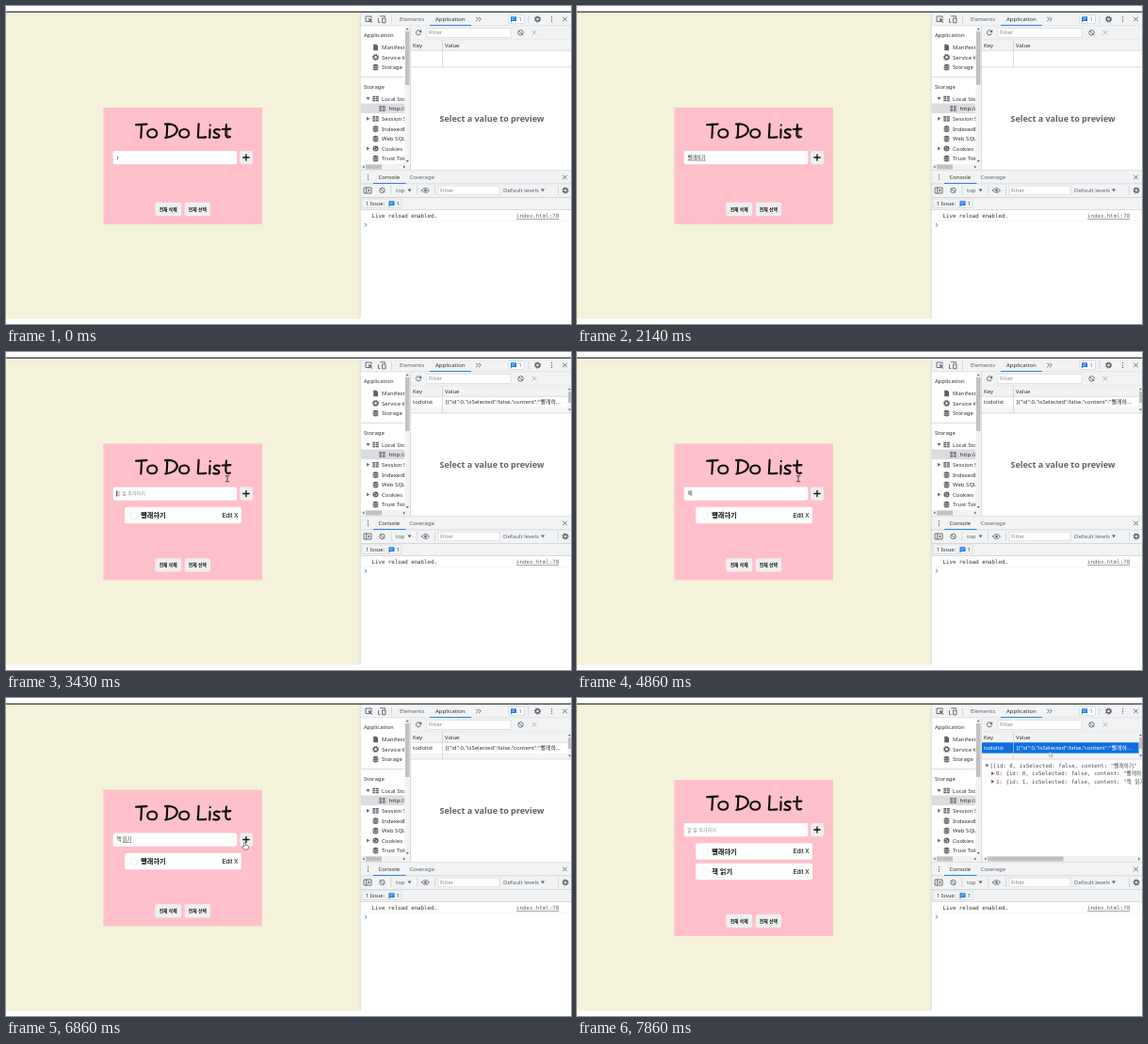
Animation, 600 px wide and 338 px high, one loop 8000 ms. Source, as an HTML page:

```html
<!DOCTYPE html>
<html lang="ko">
<head>
<meta charset="utf-8">
<title>To Do List</title>
<style>
html, body { margin: 0; width: 100%; height: 100%; overflow: hidden; background: #fff; }
svg { display: block; width: 600px; height: 338px; }
text { font-family: 'Noto Sans', 'Noto Sans CJK KR', sans-serif; white-space: pre; }
.mono { font-family: 'DejaVu Sans Mono', 'Noto Sans CJK KR', monospace; }
.kr { font-family: 'Noto Sans CJK KR', 'Noto Sans CJK', sans-serif; }
.arial { font-family: 'Liberation Sans', sans-serif; }
.line { fill: none; stroke: #5f6368; stroke-linecap: round; stroke-linejoin: round; }
</style>
</head>
<body>
<svg id="stage" viewBox="0 0 600 338" xmlns="http://www.w3.org/2000/svg"></svg>
<script>
const LOOP = 8000;
const GREY = '#5f6368', BAR = '#f1f3f4', RULE = '#cacdd1', BLUE = '#1a73e8', DARK = '#303134';

const rect = (x, y, w, h, fill, extra = '') =>
  `<rect x="${x}" y="${y}" width="${w}" height="${h}" fill="${fill}" ${extra}/>`;
// y is the vertical middle of the text
const label = (x, y, str, { size = 6, fill = DARK, cls = '', extra = '' } = {}) =>
  `<text x="${x}" y="${y + size * 0.36}" font-size="${size}" fill="${fill}" class="${cls}" ${extra}>${str}</text>`;
const stroke = (d, color = GREY, w = 0.9) =>
  `<path class="line" d="${d}" style="stroke:${color};stroke-width:${w}"/>`;
const solid = (d, fill = GREY) => `<path d="${d}" fill="${fill}"/>`;
const ring = (x, y, r, color = GREY, w = 0.9) =>
  `<circle cx="${x}" cy="${y}" r="${r}" fill="none" stroke="${color}" stroke-width="${w}"/>`;
const hRule = (x, y, w) => rect(x, y, w, 0.7, RULE);
const vRule = (x, y, h) => rect(x, y, 0.7, h, RULE);

const icon = {
  cross: (x, y, c) => stroke(`M${x - 2} ${y - 2}l4 4m0-4l-4 4`, c),
  block: (x, y) => ring(x, y, 2.7) + stroke(`M${x - 1.9} ${y - 1.9}l3.8 3.8`),
  gear: (x, y) => ring(x, y, 2, GREY, 1.3) +
    `<circle cx="${x}" cy="${y}" r="3" fill="none" stroke="${GREY}" stroke-width="1.1" stroke-dasharray="1.25 1.1"/>`,
  dots: (x, y) => [-2.4, 0, 2.4].map(d => `<circle cx="${x}" cy="${y + d}" r=".7" fill="${GREY}"/>`).join(''),
  table: (x, y) => rect(x - 3.2, y - 2.8, 6.4, 5.6, GREY) +
    stroke(`M${x - 3} ${y - 0.9}h6m-6 1.9h6m-3-3.7v5.5`, '#fff', 0.6),
  db: (x, y) => solid(`M${x - 2.8} ${y - 2.3}q2.8-1.8 5.6 0v4.8q-2.8 1.8-5.6 0z`) +
    stroke(`M${x - 2.6} ${y - 1}q2.6 1 5.2 0m-5.2 2.2q2.6 1 5.2 0`, '#fff', 0.5),
  page: (x, y) => solid(`M${x - 2.3} ${y - 3.2}h3l1.8 1.8v4.6h-4.8z`),
  cookie: (x, y) => `<circle cx="${x}" cy="${y}" r="3" fill="${GREY}"/>` +
    [[-1, -1], [1, 0.4], [-0.6, 1.3]].map(([a, b]) => `<circle cx="${x + a}" cy="${y + b}" r=".6" fill="#fff"/>`).join(''),
  chat: (x, y) => solid(`M${x - 3} ${y - 2.7}h6v4.6h-4.4l-1.6 1.5z`, BLUE) +
    stroke(`M${x - 1.6} ${y - 1.2}h3.2m-3.2 1.5h2.2`, '#fff', 0.5),
  right: (x, y) => solid(`M${x - 1.4} ${y - 2}l3 2l-3 2z`),
  down: (x, y) => solid(`M${x - 2} ${y - 1.4}h4l-2 3z`),
  up: (x, y) => solid(`M${x - 1.5} ${y + 0.8}h3l-1.5-2z`),
};

function sidebar() {
  const rows = [
    [44, 'page', 'Manifest'], [54.5, 'gear', 'Service Workers'], [65, 'db', 'Storage'],
    [98.5, 'table', 'Local Storage', 'down'], [119.8, 'table', 'Session Storage', 'right'],
    [130.5, 'db', 'IndexedDB'], [141, 'db', 'Web SQL'],
    [151.5, 'cookie', 'Cookies', 'right'], [162, 'db', 'Trust Tokens'],
  ];
  return rect(376.5, 21.5, 53, 153, '#fff') +
    `<g clip-path="url(#side)">` +
    label(380, 31, 'Application') + hRule(377, 75, 47) + label(380, 86, 'Storage') +
    rect(377, 103.5, 47, 10.6, '#dadce0') + icon.table(399.5, 109) + label(406.5, 109, 'http://127.0.0.1') +
    rows.map(([y, pic, name, arrow]) =>
      icon[pic](392.5, y) + label(399, y, name) + (arrow ? icon[arrow](384.5, y) : '')).join('') +
    `</g>` +
    rect(423.5, 21.5, 5.5, 147, BAR) + rect(424, 27, 4.5, 57, '#c1c1c1') +
    icon.up(426.2, 24.5) + solid('M424.8 164h3l-1.5 2z') +
    rect(376.5, 168, 53, 6, BAR) + rect(382, 168.5, 17, 5, '#c1c1c1') +
    solid('M380.5 169.5v3l-2-1.5z') + solid('M422 169.5v3l2-1.5z') + vRule(429.3, 21.5, 153);
}

function devtools() {
  return rect(376, 7, 224, 331, '#fff') + rect(376, 7, 224, 14, BAR) +
    // main tabs
    stroke('M386 16.5h-4v-5.5h6v2') + solid('M385 13l4.2 1.6l-1.8.7l1.6 1.8l-.9.8l-1.5-1.8l-.8 1.4z') +
    stroke('M397 17.5h-1.5v-4m2-2.7h5v1m-2.5 1.2h3v4.8h-3z') + vRule(409, 9.5, 10) +
    label(418, 14, 'Elements', { fill: GREY }) + label(456, 14, 'Application') +
    stroke('M499.5 12l2 2l-2 2m2.8-4l2 2l-2 2') +
    rect(533.5, 9.5, 17, 9, '#fff', `rx="1.5" stroke="${RULE}" stroke-width=".6"`) + icon.chat(539, 14) +
    label(544.5, 14, '1', { size: 5.5, fill: BLUE }) + vRule(554.5, 9.5, 9) +
    icon.gear(564.5, 14) + icon.dots(579.5, 14) + icon.cross(593.5, 14) +
    hRule(376, 20.7, 224) + rect(450, 20, 44, 0.9, BLUE) +
    sidebar() +
    // storage toolbar and table
    rect(430, 21.5, 170, 14, BAR) + stroke('M440 26.6a2.6 2.6 0 1 0 .5 2.4') + solid('M441.2 25v2.9h-2.9z') +
    rect(447, 23.5, 89, 9.7, '#fff', `stroke="${RULE}" stroke-width=".5"`) +
    label(449, 28.3, 'Filter', { fill: '#80868b' }) + icon.block(546.5, 28.3) + icon.cross(561, 28.3, '#aaa') +
    hRule(430, 35.7, 170) + rect(430, 36.4, 170, 10.4, BAR) +
    label(432, 41.8, 'Key') + label(466, 41.8, 'Value') + hRule(430, 46.8, 170) +
    '<g id="table"></g>' + hRule(430, 64.6, 170) + '<g id="preview"></g>' +
    // console drawer
    hRule(376, 174, 224) + rect(376, 174.7, 224, 41.5, BAR) +
    icon.dots(384.5, 182) + label(395.5, 182, 'Console') + label(428.5, 182, 'Coverage', { fill: GREY }) +
    icon.cross(593.5, 182) + hRule(376, 188.6, 224) + rect(390, 188, 34.5, 0.9, BLUE) +
    stroke('M380.5 193h7.5v6h-7.5zm2.2 0v6') + solid('M384.5 194.3l2.4 1.7l-2.4 1.7z') + icon.block(399.5, 196) +
    vRule(408.5, 191, 10) + label(414, 196, 'top', { fill: GREY }) + icon.down(428.5, 196) + vRule(436.5, 191, 10) +
    stroke('M441.5 196q4-5 8 0q-4 5-8 0z') + `<circle cx="445.5" cy="196" r="1.3" fill="${GREY}"/>` + vRule(455, 191, 10) +
    rect(459, 191.2, 65, 9.6, '#fff', `stroke="${RULE}" stroke-width=".5"`) +
    label(461, 196, 'Filter', { fill: '#80868b' }) + label(528, 196, 'Default levels', { fill: GREY }) +
    icon.down(570, 196) + vRule(586, 191, 10) + icon.gear(594, 196) + hRule(376, 203, 224) +
    rect(378, 205, 42, 9.8, BAR, `stroke="${RULE}" stroke-width=".5"`) +
    label(382, 210, '1 Issue:', { size: 5.6 }) + icon.chat(409.5, 210) + label(414.5, 210, '1', { size: 5.6 }) +
    hRule(376, 216, 224) + label(388.5, 223, 'Live reload enabled.', { size: 5.78, cls: 'mono' }) +
    label(542, 223, 'index.html:78', { size: 5.78, cls: 'mono', fill: GREY, extra: 'text-decoration="underline"' }) +
    rect(376, 228, 224, 0.5, '#eee') + stroke('M381.3 231.2l1.6 1.6l-1.6 1.6', BLUE) + vRule(375.8, 7, 325);
}

// Handwritten heading, relative to the card's top edge
const heading = '<g role="img" aria-label="To Do List">' + [
  'M138 18.2Q144 17.6 149.5 17.6M144 18Q143.8 25 143.3 32',
  'M155.6 23C148.6 22.8 148.4 31.8 154.8 31.8C161.8 31.8 162 23.2 155.6 23',
  'M171.2 18Q171.2 25 170.5 31.8M169 17.6C186 15.6 186 30.8 169.2 32',
  'M189.6 23C182.6 22.8 182.4 31.8 188.8 31.8C195.8 31.8 196 23.2 189.6 23',
  'M204.6 17.3Q204.4 25 203.8 31.6Q208.4 32 212.4 31.4',
  'M216.5 23.4Q216.6 28 216.2 32M216.8 18.6v.2',
  'M226.8 23.6C222 22 218.6 25.2 222.8 27.2C229.3 29.6 226.3 33 220.2 31.4',
  'M234 18Q233.4 25 233.4 28.6Q233.8 32.8 238 31M229.8 23Q234 22.7 238.4 22.6',
].map(d => stroke(d, '#0c0a0a', 2.1)).join('') + '</g>';

function card(items, { text, underlined, caret }) {
  const height = 124 + 21 * items.length;
  const button = (x, w, name) => rect(x, height - 23.3, w, 14.3, '#efefef', 'rx="2"') +
    label(x + w / 2, height - 16.2, name, { size: 4.8, cls: 'kr', fill: '#111', extra: 'text-anchor="middle" font-weight="700"' });
  const typed = text
    ? label(117.5, 53, text, { size: 5.2, cls: 'kr', fill: '#333' })
    : label(117, 53, '할 일 추가하기', { size: 5.1, cls: 'kr', fill: '#858585' });
  const [from, chars] = underlined;
  return `<g transform="translate(0 ${170 - height / 2})">` +
    rect(103.3, 0, 168.7, height, '#ffc0cb') + heading +
    rect(113.7, 46, 131.6, 14.3, '#fff', 'rx="2"') + typed +
    (chars ? rect(from, 55.8, chars * 4.78, 0.5, '#444') : '') +
    (caret ? rect(117.4, 50, 0.7, 6, '#000') : '') +
    rect(248.3, 46, 13.7, 14.3, '#efefef', 'rx="2"') + stroke('M251.8 53h6.4m-3.2-3.2v6.4', '#111', 1.3) +
    items.map((name, i) => {
      const y = 67.3 + 21.4 * i, mid = y + 8.8;
      return rect(126, y, 124, 17.5, '#fff', 'rx="2"') + ring(136, mid, 4, '#e6e6e6', 0.6) +
        label(143.2, mid, name, { size: 7.2, cls: 'kr', fill: '#111', extra: 'font-weight="700"' }) +
        label(229.4, mid, 'Edit X', { size: 6.4, cls: 'arial', fill: '#000' });
    }).join('') +
    button(158.3, 27.8, '전체 삭제') + button(189.7, 27.3, '전체 선택') + '</g>';
}

function tableRow(filled, selected) {
  const ink = selected ? '#fff' : DARK;
  let out = '';
  if (filled) {
    out += rect(430, 58.7, 170, 6, '#f5f5f5') +
      (selected ? rect(430, 47.3, 170, 11.4, '#0f6fe0') : '') +
      label(432, 53, 'todolist', { fill: ink }) +
      label(466.5, 53, '[{"id":0,"isSelected":false,"content":"빨래하…', { fill: ink }) +
      rect(596.5, 36.5, 3.5, 28, BAR) + rect(597, 42, 3, 12, '#c1c1c1') + icon.up(598.4, 39.5) + solid('M597 60.5h3l-1.5 2z');
  }
  return out + vRule(463.3, 36, 28.7);
}

function preview(open) {
  if (!open) {
    return label(516, 120, 'Select a value to preview',
      { size: 9, fill: GREY, extra: 'text-anchor="middle" font-weight="700"' });
  }
  const mono = { size: 5.75, cls: 'mono', fill: '#484b4f' };
  const entry = (id, name) => `{id: ${id}, isSelected: false, content: "${name}"`;
  return icon.down(435.3, 72) + label(438.6, 72, '[' + entry(0, '빨래하기'), mono) +
    ['빨래하기', '책 읽기'].map((name, i) => {
      const y = 80.3 + 8.4 * i;
      return icon.right(441.5, y) + label(445, y, i, { ...mono, fill: '#8a2f6e' }) +
        label(448.5, y, ': ' + entry(i, name), mono);
    }).join('') +
    rect(430, 168, 170, 6, BAR) + rect(436, 168.5, 80.5, 5, '#c1c1c1') +
    solid('M434.5 169.5v3l-2-1.5z') + solid('M596 169.5v3l2-1.5z');
}

const pointers = {
  beam: '<path class="line" d="M-1.8-3q1.8 0 1.8.8q0-.8 1.8-.8M0-2.2v5M-1.8 3.4q1.8 0 1.8-.8q0 .8 1.8.8" style="stroke:#222;stroke-width:.8"/>',
  hand: '<path d="M-1.2 1.2V-3.2q.8-1 1.6 0v2.5l2.6.7q.8.4.5 1.6l-.6 2.4h-3.8l-2.2-2.7q-.2-1.4 1.9-.1z" fill="#fff" stroke="#333" stroke-width=".6"/>',
  arrow: '<path d="M-1.3-3v5.4l1.3-1.2l.9 2l.9-.4l-.9-2h1.7z" fill="#fff" stroke="#777" stroke-width=".5"/>',
};

// Each list holds [start time, value...] steps
const typing = [
  [0, 'r'], [140, ''], [860, '빠'], [1000, '빨'], [1140, '빨래'], [1290, '빨랳'], [1430, '빨래하'], [1570, '빨래하기'],
  [2430, ''], [4290, 'ㅊ'], [4430, '채'], [5000, '책'], [5140, '책 '], [5290, '책 이'], [5430, '책 일'],
  [5570, '책 읽'], [5710, '책 읽기'], [7000, ''],
];
const carets = [[0, false], [140, true], [430, false], [2430, true], [3000, false], [3430, true], [4000, false]];
const mouse = [
  [0, 'beam', 235, 134.5], [6290, 'beam', 237, 137], [6430, 'beam', 243, 146], [6570, 'hand', 251, 154],
  [6710, 'hand', 254, 157], [7000, 'arrow', 254, 157], [7430, 'arrow', 300, 137], [7570, 'arrow', 405, 92],
  [7710, 'arrow', 488, 62], [7860, 'arrow', 503, 60],
];
const at = (steps, t) => steps.findLast(([start]) => start <= t).slice(1);

const stage = document.getElementById('stage');
stage.innerHTML = '<defs><clipPath id="side"><rect x="377" y="21" width="46.5" height="147"/></clipPath></defs>' +
  rect(0, 0, 600, 338, '#fff') + rect(0, 7, 376, 325.5, '#f4f2d8') + devtools() +
  rect(0, 5.6, 600, 1.4, '#45464c') + '<g id="card"></g><g id="mouse"></g>';

function put(id, html) {
  const node = document.getElementById(id);
  if (node.shown !== html) node.innerHTML = node.shown = html;
}

function draw(t) {
  const items = ['빨래하기', '책 읽기'].slice(0, (t >= 2430) + (t >= 7000));
  const [text] = at(typing, t);
  const [caret] = at(carets, t);
  const second = text.startsWith('책 ');
  const underlined = second ? [123.5, text.length - 2] : [117.5, /^[빠빨]/.test(text) ? text.length : 0];
  const selected = t >= 7860;
  const [kind, x, y] = at(mouse, t);
  put('card', card(items, { text, underlined, caret: caret && !text }));
  put('table', tableRow(items.length > 0, selected));
  put('preview', preview(selected));
  put('mouse', `<g transform="translate(${x} ${y})">${pointers[kind]}</g>`);
}

function tick() {
  draw(performance.now() % LOOP);
  requestAnimationFrame(tick);
}
tick();
</script>
</body>
</html>
```
